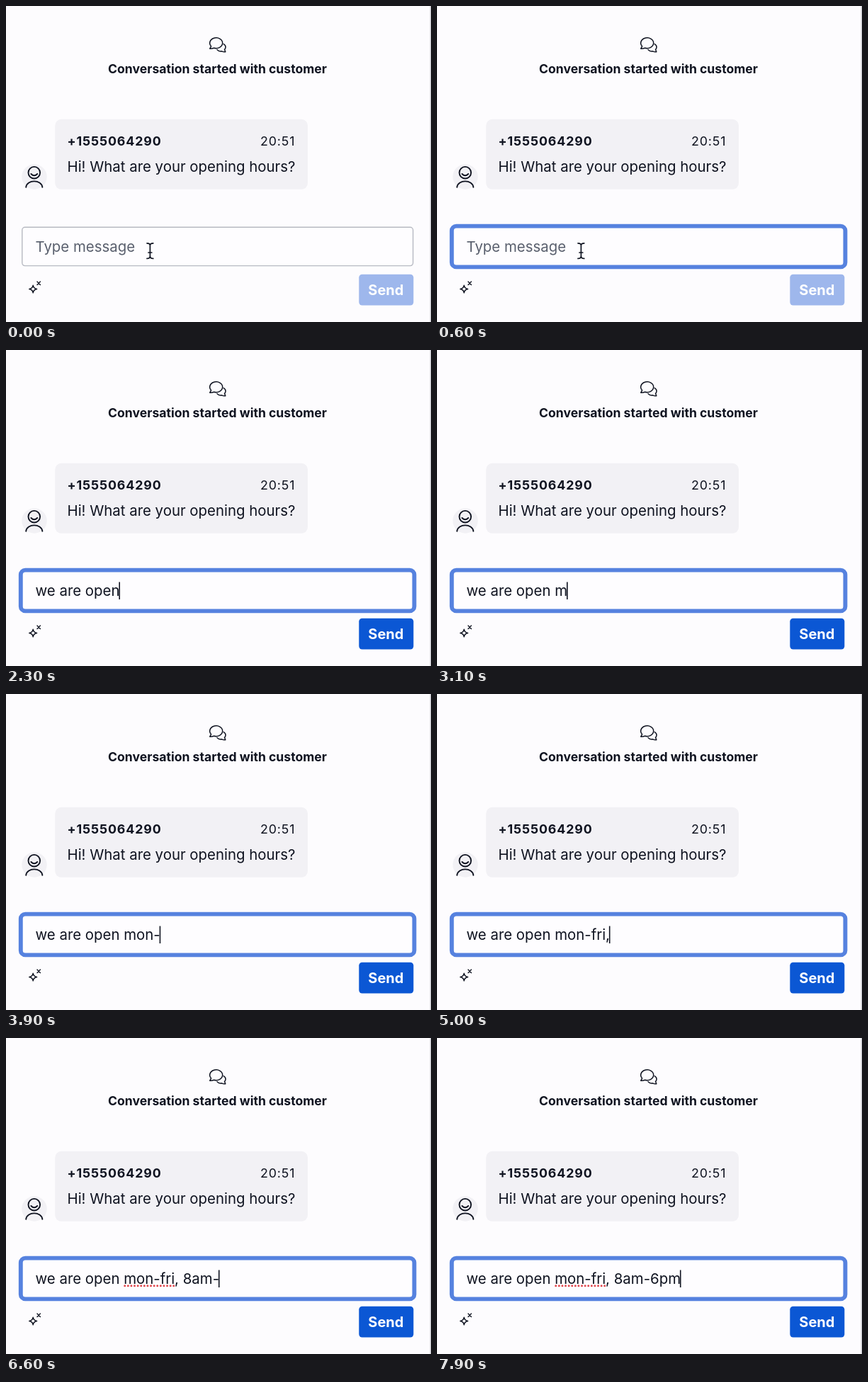
An HTML page for the animation above (8000 ms loop, 600 by 446 pixels).

```html
<!DOCTYPE html>
<html lang="en">
<head>
<meta charset="utf-8">
<title>Chat reply</title>
<style>
html, body { margin: 0; width: 100%; height: 100%; overflow: hidden; background: #fdfcfe; }
svg { display: block; width: 600px; height: 446px; }
text { font: 400 20.4px Inter, sans-serif; fill: #0f1320; white-space: pre; }
.small { font-size: 17.85px; letter-spacing: .85px; }
.bold { font-weight: 700; }
.line { fill: none; stroke: #0f1320; stroke-linecap: round; stroke-linejoin: round; }
</style>
</head>
<body>
<svg viewBox="0 0 600 446">
  <rect width="600" height="446" fill="#fdfcfe"/>
  <path d="M599.3 0V446" stroke="#cfcfd6" stroke-width="1.4"/>

  <g class="line" stroke-width="1.5">
    <path d="M287.8 60.2L289.6 56.8A9 7.4 0 1 1 293.6 59.2Q290.8 60.4 287.8 60.2Z"/>
    <path d="M307.2 53.6Q310.4 55.4 310 58.6Q309.7 60.4 308.6 61.4L309.8 64.8Q306.8 65 304.6 63.8Q300.4 64.6 298 61.6"/>
  </g>
  <text class="bold" x="298.5" y="95.2" text-anchor="middle" style="font-size:17.6px">Conversation started with customer</text>

  <rect x="69.2" y="159.8" width="356.8" height="99" rx="9" fill="#f2f1f5"/>
  <text class="small bold" x="86.6" y="197.4">+1555064290</text>
  <text class="small" x="359" y="197.4">20:51</text>
  <text x="86.5" y="234">Hi! What are your opening hours?</text>

  <circle cx="40" cy="241" r="17.7" fill="#f2f1f5"/>
  <g class="line" stroke-width="1.9">
    <circle cx="39.8" cy="235.2" r="8.3"/>
    <path d="M35.4 237Q39.8 241.4 44.2 237M28.2 255.8C29.4 244.6 50.2 244.6 51.4 255.8"/>
  </g>

  <rect id="box" fill="#fefdff"/>
  <path id="dots" stroke="#e0484e" stroke-width="3" stroke-linecap="round" stroke-dasharray="0 4.6"/>
  <text id="msg" x="41.5" y="347"></text>
  <path id="caret" stroke="#0f1320" stroke-width="1.6"/>

  <path id="pointer" class="line" stroke-width="1.7" d="M199 334.8Q203.4 334.8 203.4 338Q203.4 334.8 207.8 334.8M203.4 337V354M199 356.4Q203.4 356.4 203.4 353Q203.4 356.4 207.8 356.4M201 348H205.8"/>

  <g class="line" stroke-width="1.4">
    <path d="M38.2 394.2Q38.9 398.8 43.6 399.5Q38.9 400.2 38.2 404.8Q37.5 400.2 32.8 399.5Q37.5 398.8 38.2 394.2Z"/>
    <path d="M44 389L48.4 393.4M48.4 389L44 393.4"/>
  </g>
  <rect id="send" x="498.3" y="378.8" width="77" height="43.7" rx="4.5"/>
  <text class="bold" x="536.4" y="408" text-anchor="middle" style="font-size:20px;fill:#fff">Send</text>
</svg>
<script>
const LOOP = 8000, FOCUS = 100, LEFT = 41.5;
const MESSAGE = 'we are open mon-fri, 8am-6pm';
const WORD = [12, 19], SPELLCHECK = 5300;
// One key time per character; the first words come at a steady pace.
const KEYS = [...Array.from({ length: 11 }, (_, i) => 1250 + i * 100),
  2700, 3000, 3200, 3400, 3700, 4100, 4300, 4500, 4900,
  5250, 5600, 5900, 6150, 6500, 6900, 7200, 7500];

const [box, dots, msg, caret, pointer, send] =
  ['box', 'dots', 'msg', 'caret', 'pointer', 'send'].map(id => document.getElementById(id));

function set(el, attrs) {
  for (const key in attrs) el.setAttribute(key, attrs[key]);
}

function show(el, on) {
  el.style.display = on ? '' : 'none';
}

function draw(now) {
  const t = now % LOOP;
  const count = KEYS.filter(k => k <= t).length;
  const focused = t >= FOCUS;
  const typing = count > 0;

  set(box, focused
    ? { x: 20.8, y: 310.6, width: 555.6, height: 57.8, rx: 6.5, stroke: '#5682df', 'stroke-width': 5.9 }
    : { x: 22.8, y: 312.2, width: 551.8, height: 54.4, rx: 4, stroke: '#b7bac2', 'stroke-width': 1.4 });

  const text = typing ? MESSAGE.slice(0, count) : 'Type message';
  if (msg.textContent !== text) msg.textContent = text;
  msg.style.fill = typing ? '' : '#5a606e';
  send.setAttribute('fill', typing ? '#0b57d4' : '#9eb7ec');
  show(pointer, !typing);

  const idle = t - (typing ? KEYS[count - 1] : FOCUS);
  show(caret, focused && idle % 1000 < 500);
  const end = LEFT + (typing ? msg.getComputedTextLength() : 0);
  set(caret, { d: `M${end - .3} 327.5V352` });

  const checked = t >= SPELLCHECK;
  show(dots, checked);
  if (checked) {
    const [from, to] = WORD.map(n => LEFT + msg.getSubStringLength(0, n));
    set(dots, { d: `M${from + 1.5} 349.7H${to - 1}` });
  }
  requestAnimationFrame(draw);
}
draw(performance.now());
</script>
</body>
</html>
```
